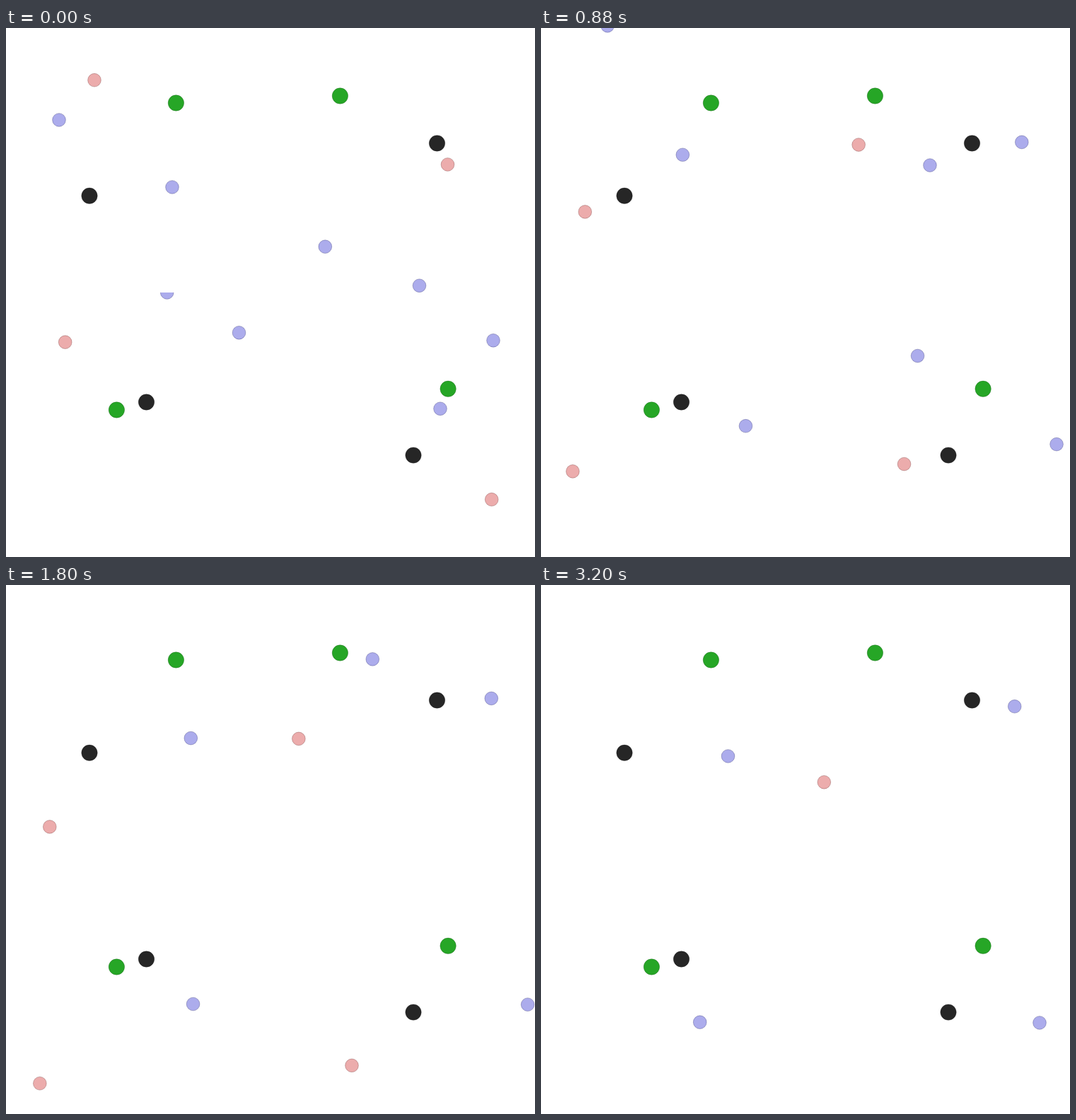
Recreate the animation shown at these times as an HTML page with a canvas. Size 748 by 748 pixels, loop 3240 ms.

```html
<!DOCTYPE html>
<html>
<head>
<meta charset="utf-8">
<style>
html, body { margin: 0; width: 100%; height: 100%; overflow: hidden; background: #fff; }
canvas { display: block; }
</style>
</head>
<body>
<canvas id="stage" width="748" height="748"></canvas>
<script>
const ctx = document.getElementById('stage').getContext('2d');
const LOOP = 3240, STEP = 40, HALF = 374;

// Waypoints lie close together while the dots are fast; after the last one a dot coasts.
const TIMES = [0, 560, 1200, 2600, 3200];

const RED = { size: .05, fill: '#ecacac', line: '#6c2d2d' };
const BLUE = { size: .05, fill: '#acacec', line: '#2d2d6c' };
const GREEN = { size: .06, fill: '#26a626', line: '#135313' };
const BLACK = { size: .06, fill: '#262626', line: '#131313' };

const panels = [
  {
    green: [240.4, 106], black: [118, 237.3],
    red: [[125, 73.7], [67, 208.2], [60.5, 297.7], [65, 390]],
    blues: [
      [[235, 225], [145.3, 79.8]],
      [[75, 130], [151.5, 159.2], [235.5, 196.5], [277, 235], [264.5, 242]]
    ]
  },
  {
    green: [472.4, 96], black: [609.5, 163],
    red: [[624.5, 193], [498, 155.5], [422, 182.3], [407, 261.7], [400.3, 278.8]],
    blues: [
      [[451.3, 309.2], [541.2, 221.5], [553.3, 168.8], [432, 11.8]],
      [[584.5, 364.3], [658.8, 186.2], [689.5, 151.5], [677.5, 174], [669.7, 171.7]]
    ]
  },
  {
    green: [156.4, 540], black: [198.5, 529],
    red: [[83.7, 444.2], [41.7, 579], [48, 661.7], [47.5, 752.3]],
    blues: [
      [[227.7, 374], [210, 329]],
      [[329.5, 430.8], [300.7, 540], [280, 576.5], [244.3, 608.2], [224.7, 618.2]]
    ]
  },
  {
    green: [625.1, 510.3], black: [576, 604.1],
    red: [[686.7, 666.7], [549.7, 602.8], [495.2, 640.3], [483.8, 733.5]],
    blues: [
      [[614, 538.3], [557.5, 502], [509.3, 418]],
      [[689, 441.8], [710, 589], [741.3, 588.2], [725.7, 607], [705, 619]]
    ]
  }
];

const slope = (v, i) => (v[i + 1] - v[i]) / (TIMES[i + 1] - TIMES[i]);

// Harmonic means keep the glide free of overshoot; the start is near rest.
function speed(v, i) {
  if (i === 0) return 0.3 * slope(v, 0);
  const before = slope(v, i - 1);
  if (i === v.length - 1) return before;
  const after = slope(v, i);
  return before * after > 0 ? 2 * before * after / (before + after) : 0;
}

function glide(v, t) {
  const last = v.length - 1;
  if (t >= TIMES[last]) return v[last] + speed(v, last) * (t - TIMES[last]);
  const i = TIMES.findLastIndex(start => start <= t);
  const span = TIMES[i + 1] - TIMES[i];
  const s = (t - TIMES[i]) / span;
  return v[i] + (v[i + 1] - v[i]) * s * s * (3 - 2 * s) +
    span * s * (1 - s) * ((1 - s) * speed(v, i) - s * speed(v, i + 1));
}

const position = (path, t) => [0, 1].map(axis => glide(path.map(p => p[axis]), t));

function dot([x, y], { size, fill, line }) {
  ctx.beginPath();
  ctx.arc(x, y, size * HALF / 2, 0, 2 * Math.PI);
  ctx.fillStyle = fill;
  ctx.fill();
  ctx.globalAlpha = 0.33;
  ctx.strokeStyle = line;
  ctx.stroke();
  ctx.globalAlpha = 1;
}

function draw(now) {
  const t = Math.floor(now % LOOP / STEP) * STEP;
  ctx.clearRect(0, 0, 748, 748);
  panels.forEach(({ red, blues, green, black }, i) => {
    ctx.save();
    ctx.beginPath();
    ctx.rect(i % 2 * HALF, Math.floor(i / 2) * HALF, HALF, HALF);
    ctx.clip();
    dot(position(red, t), RED);
    for (const path of blues) dot(position(path, t), BLUE);
    dot(green, GREEN);
    dot(black, BLACK);
    ctx.restore();
  });
}

const start = performance.now();
function tick() {
  draw(performance.now() - start);
  requestAnimationFrame(tick);
}
tick();
</script>
</body>
</html>
```
